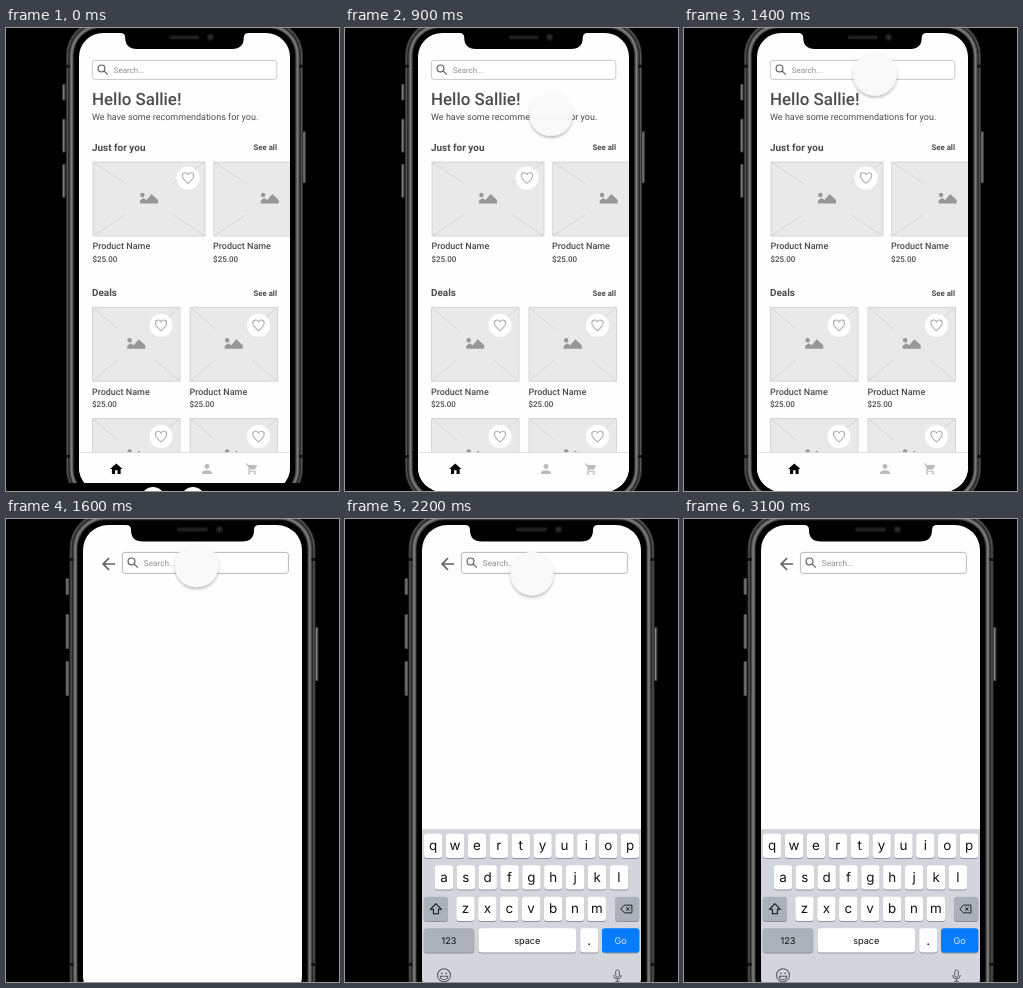
Recreate the animation shown at these times as an HTML page. Size 333 by 463 pixels, loop 3700 ms.

```html
<!DOCTYPE html>
<html lang="en">
<head>
<meta charset="utf-8">
<title>Shop search prototype</title>
<style>
  html, body { margin: 0; width: 100%; height: 100%; overflow: hidden; background: #000; }
  svg { display: block; width: 333px; height: 463px; }
  text { font-family: Roboto, sans-serif; text-rendering: geometricPrecision; }
  .key { font-family: Inter, sans-serif; text-anchor: middle; }
</style>
</head>
<body>
<svg id="stage" viewBox="0 0 333 463"></svg>
<script>
const LOOP = 3700, STEP = 100;

// Basic shapes
const rect = (x, y, w, h, r, fill, extra = '') =>
  `<rect x="${x}" y="${y}" width="${w}" height="${h}" rx="${r}" fill="${fill}" ${extra}/>`;
const circle = (x, y, r, fill, extra = '') =>
  `<circle cx="${x}" cy="${y}" r="${r}" fill="${fill}" ${extra}/>`;
const path = (d, fill, extra = '') => `<path d="${d}" fill="${fill}" ${extra}/>`;
const line = (d, color, w) => path(d, 'none', `stroke="${color}" stroke-width="${w}"`);
const text = (s, x, y, size, weight = 400, fill = '#4c4c4c', extra = '') =>
  `<text x="${x}" y="${y}" font-size="${size}" font-weight="${weight}" fill="${fill}" ${extra}>${s}</text>`;
// Places a 24-unit icon by its centre
const icon = (body, x, y, s) =>
  `<g transform="translate(${x - 12 * s} ${y - 12 * s}) scale(${s})">${body}</g>`;

const glyph = {
  heart: line('M12 20.3C6 15 3 12 3 8.5A4.6 4.6 0 0 1 12 6.6A4.6 4.6 0 0 1 21 8.5C21 12 18 15 12 20.3z', '#b0b0b0', 1.8),
  search: line('M15.2 9.5a5.7 5.7 0 1 0-11.4 0a5.7 5.7 0 0 0 11.4 0zM13.6 13.6L20 20', '#606060', 2),
  back: path('M20 11H7.8l5.6-5.6L12 4l-8 8 8 8 1.4-1.4L7.8 13H20z', '#606060'),
  home: path('M10 20v-6h4v6h5v-8h3L12 3 2 12h3v8z', '#000'),
  person: path('M12 12a4 4 0 1 0 0-8 4 4 0 0 0 0 8zm0 2c-2.7 0-8 1.3-8 4v2h16v-2c0-2.7-5.3-4-8-4z', '#bbb'),
  cart: path('M7 18a2 2 0 1 0 0 4 2 2 0 0 0 0-4zM1 2v2h2l3.6 7.6-1.4 2.4C4.5 15.4 5.5 17 7 17h12v-2H7.4l1.1-2H16c.7 0 1.4-.4 1.7-1L21.3 5H5.2L4.3 2zM17 18a2 2 0 1 0 0 4 2 2 0 0 0 0-4z', '#bbb'),
  shift: line('M12 3.5L3.5 12.5H8V19.5H16V12.5H20.5z', '#111', 1.6),
  erase: line('M8.5 5.5H21V18.5H8.5L2.5 12zM11.5 9L17 15M17 9L11.5 15', '#111', 1.5),
  smile: line('M21.5 12a9.5 9.5 0 1 0-19 0a9.5 9.5 0 0 0 19 0zM6.5 13.5H17.5C17 20 7 20 6.5 13.5z', '#555', 1.5) +
    circle(8.7, 9, 1.3, '#555') + circle(15.3, 9, 1.3, '#555'),
  mic: line('M9 6a3 3 0 0 1 6 0V12a3 3 0 0 1-6 0zM5.5 11.5a6.5 6.5 0 0 0 13 0M12 18V22M8.5 22H15.5', '#555', 1.6)
};

function phone() {
  const body = (d, fill) => rect(63.5 + d, -7 + d, 246 - 2 * d, 502 - 2 * d, 36 - d, fill);
  const button = (x, y, h) => rect(x, y, 3.4, h, 1, '#4a4a4a') + rect(x + 1, y + 1, 1, h - 2, .5, '#888');
  let s = button(59.6, 59, 17) + button(59.6, 95, 35) + button(59.6, 142, 35) + button(309, 108, 54);
  s += body(0, '#2e2e2e') + body(1, '#555') + body(2.2, '#262626') + body(3.6, '#4c4c4c') +
    body(4.8, '#7c7c7c') + body(6.4, '#555') + body(7.6, '#1c1c1c') + body(8.4, '#000');
  for (const y of [39, 444]) s += rect(63.5, y, 4, 3, 0, '#111') + rect(305.5, y, 4, 3, 0, '#111');
  return s + rect(77, 6, 219, 476, 25, '#fefefe');
}

function notch() {
  return path('M120 5H253V6Q248 6 248 11Q248 22.5 236 22.5H137Q125 22.5 125 11Q125 6 120 6z', '#000') +
    rect(171, 8.6, 31, 4, 2, '#1e1e1e') + circle(213.5, 10.5, 3.6, '#1b1b1f') + circle(213.5, 10.5, 1.3, '#34343c');
}

function placeholder(x, y, w) {
  const h = 74, a = w * .29, b = h * .29, r = x + w, t = y + h, cx = x + w / 2, cy = y + h / 2 - .6;
  const wide = w > 100, hx = r - (wide ? 17 : 19), hy = y + (wide ? 16 : 18);
  return rect(x, y, w, h, .5, '#e9e9e9', 'stroke="#cecece" stroke-width=".8"') +
    line(`M${x} ${y}l${a} ${b}M${r} ${y}l${-a} ${b}M${x} ${t}l${a} ${-b}M${r} ${t}l${-a} ${-b}`, '#d0d0d0', .8) +
    circle(cx - 6.6, cy - 3.4, 2.2, '#979797') +
    path(`M${cx - 9} ${cy + 5}v-3l3.5-2.5 3 2 5-6 6.5 6v3.5z`, '#979797') +
    circle(hx, hy, 11.5, '#fff') + icon(glyph.heart, hx, hy + .3, .62);
}

const product = (x, y, w) => placeholder(x, y, w) +
  text('Product Name', x - .6, y + 87.2, 9, 500) + text('$25.00', x - .6, y + 99.8, 8, 500);

const heading = (s, y) => text(s, 86, y, 9.95, 700) +
  text('See all', 271, y - .2, 7.8, 700, '#4c4c4c', 'text-anchor="end"');

const field = (x, y, w, h, size, border) =>
  rect(x, y, w, h, 2.5, '#fff', `stroke="${border}" stroke-width=".8"`) +
  icon(glyph.search, x + 10.6, y + h / 2, .6) +
  text('Search...', x + 21.4, y + h / 2 + 2.8, size, 400, '#8f8f8f');

function homeScreen() {
  const fit = 'transform="translate(-1.19 -.8) scale(.9635)"';
  return `<g ${fit}>${phone()}</g><g clip-path="url(#screen)">` +
    field(86.4, 32.4, 184.4, 19, 7.9, '#bdbdbd') +
    text('Hello Sallie!', 86, 77, 16.9, 500) +
    text('We have some recommendations for you.', 86, 92.3, 9.03) +
    heading('Just for you', 122.5) + product(87, 134, 112) + product(207.7, 134, 112) +
    heading('Deals', 268) +
    [279.3, 390.5].map(y => product(86.5, y, 87.5) + product(184, y, 87.5)).join('') +
    rect(73, 424.5, 211, 40, 0, '#fefefe') + rect(73, 424, 211, .8, 0, '#ddd') +
    icon(glyph.home, 110.3, 441, .62) + icon(glyph.person, 201, 441, .62) + icon(glyph.cart, 246, 441, .56) +
    `</g><g ${fit}>${notch()}</g>`;
}

function keyboard() {
  const key = (x, y, w, label, size, fill = '#fff', ink = '#111') =>
    rect(x, y + 1, w, 24.3, 3, '#8f9298') + rect(x, y, w, 24.3, 3, fill) +
    text(label, x + w / 2, y + (size > 10 ? 16.4 : 15.2), size, 400, ink, 'class="key"');
  const grey = '#abb0ba';
  let s = rect(77, 310, 219, 175, 0, '#d2d5db');
  [['qwertyuiop', 88.2, 314.7], ['asdfghjkl', 98.9, 346.2], ['zxcvbnm', 120.5, 377.8]].forEach(([row, x, y]) =>
    [...row].forEach((c, i) => { s += key(x + i * 21.88 - 9.2, y, 18.4, c, 13.4); }));
  s += key(78.8, 377.8, 24.2, '', 9, grey) + icon(glyph.shift, 90.9, 390, .63) +
    key(270, 377.8, 24.2, '', 9, grey) + icon(glyph.erase, 281.5, 390, .6) +
    key(78.8, 409.3, 50.4, '123', 9.2, grey) + key(133.6, 409.3, 97.4, 'space', 9.2) +
    key(235.2, 409.3, 18.2, '.', 13.4) + key(257, 409.3, 37.3, 'Go', 9.2, '#067bfb', '#cfe5ff');
  return s + icon(glyph.smile, 99, 456.3, .68) + icon(glyph.mic, 272.5, 456.3, .6);
}

const stage = document.getElementById('stage');
stage.innerHTML = `<defs>
  <clipPath id="screen"><rect x="73" y="5" width="211" height="458.6" rx="24"/></clipPath>
  <clipPath id="panel"><rect x="77" y="6" width="219" height="476" rx="25"/></clipPath>
  <filter id="shadow" x="-30%" y="-30%" width="160%" height="160%">
    <feDropShadow dx="0" dy="2" stdDeviation="1.6" flood-color="#000" flood-opacity=".28"/>
  </filter></defs>
  ${rect(0, 0, 333, 463, 0, '#000')}
  <g id="home">${homeScreen()}</g>
  <g id="find">${phone()}${icon(glyph.back, 102.5, 45, .82)}${field(116.4, 33.4, 166, 21, 8.2, '#a8a8a8')}
    <g clip-path="url(#panel)"><g id="keys">${keyboard()}</g></g>${notch()}</g>
  <g id="strip">${rect(0, 455, 333, 8, 0, '#000')}${circle(147, 471, 12, '#fff')}${circle(187, 471, 12, '#fff')}</g>
  <g id="touch">${circle(0, 0, 21.8, '#fafafa', 'fill-opacity=".97" filter="url(#shadow)"')}</g>`;

const [home, find, keys, strip, touch] =
  ['home', 'find', 'keys', 'strip', 'touch'].map(id => document.getElementById(id));
const span = (t, a, b) => Math.min(1, Math.max(0, (t - a) / (b - a)));
const smooth = p => p * p * (3 - 2 * p);
const show = (el, on) => el.setAttribute('visibility', on ? 'visible' : 'hidden');

function draw(t) {
  show(strip, t < 400);
  show(home, t < 1500);
  show(find, t >= 1500);

  const slide = 169 * (1 - span(t, 1600, 2150)) ** 3;
  keys.setAttribute('transform', `translate(0 ${slide.toFixed(2)})`);

  // Glide up to the search field, then drift slowly and fade
  const glide = smooth(span(t, 500, 1320)), drift = span(t, 1550, 2200);
  const x = 220 - 29 * glide - 4 * drift, y = 123.5 - 77.7 * glide + 8.7 * drift;
  touch.setAttribute('transform', `translate(${x.toFixed(2)} ${y.toFixed(2)})`);
  show(touch, t >= 400);
  touch.setAttribute('opacity', span(t, 300, 600) * (1 - span(t, 2700, 3100)));
}

const start = performance.now();
function tick() {
  const t = (performance.now() - start) % LOOP;
  draw(Math.floor(t / STEP) * STEP);
  requestAnimationFrame(tick);
}
tick();
</script>
</body>
</html>
```
